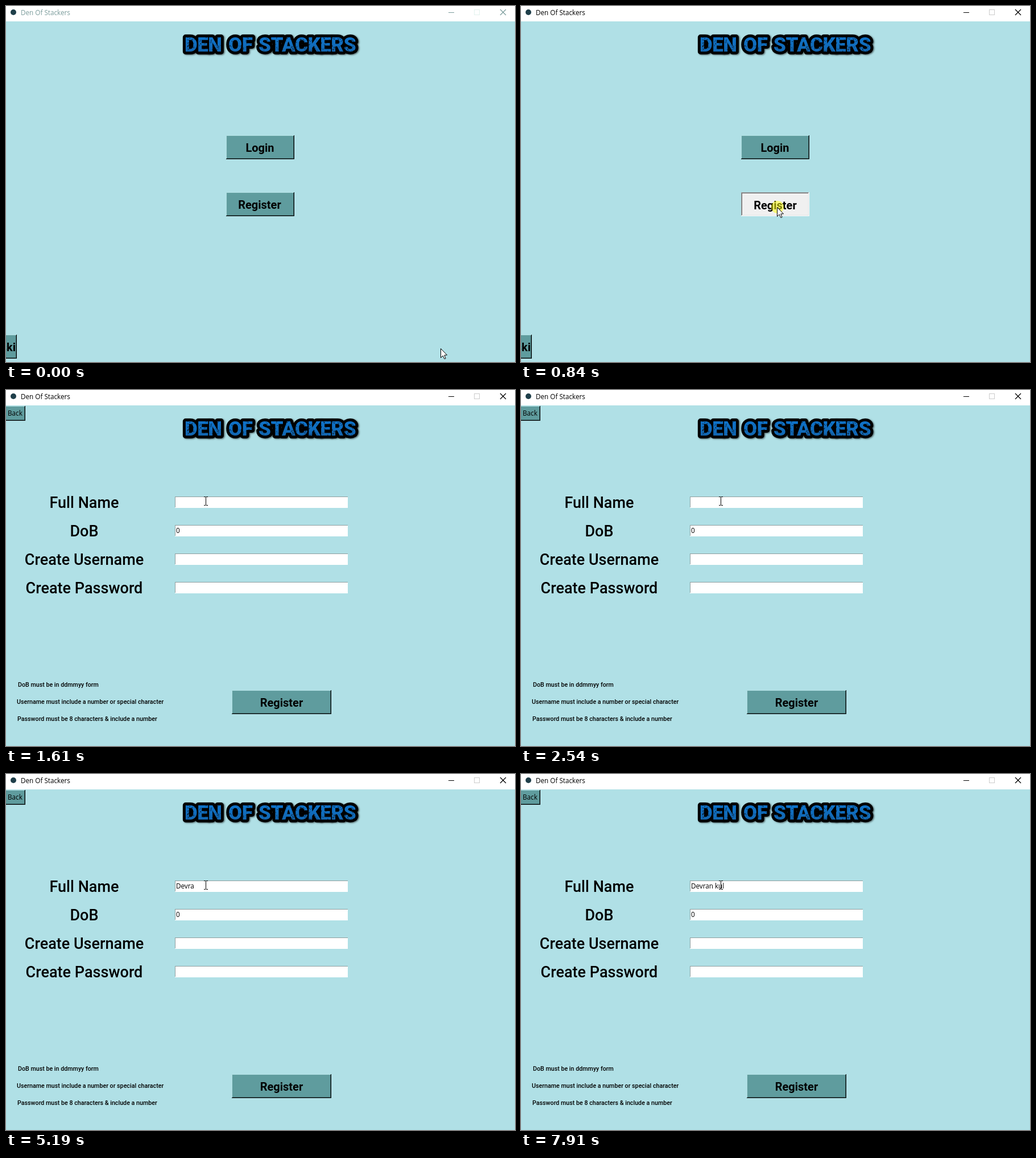
Recreate the animation shown at these times as an HTML page with a canvas. Size 895x625 px, loop 8000 ms.

```html
<!DOCTYPE html>
<html lang="en">
<head>
<meta charset="utf-8">
<title>Den Of Stackers</title>
<style>
html, body { margin: 0; width: 100%; height: 100%; overflow: hidden; background: #b0e0e6; }
canvas { display: block; }
</style>
</head>
<body>
<canvas id="stage" width="895" height="625"></canvas>
<script>
const LOOP = 8000;
const ctx = document.getElementById('stage').getContext('2d');
const UI = '11.7px "Open Sans", "Noto Sans", sans-serif';
const face = (weight, size) => `${weight} ${size}px Roboto, Inter, sans-serif`;
const BOLD = face(600, 20), LABEL = face(500, 27), HINT = face(500, 10.7);
const TEAL = { fill: '#5f9c9e', light: '#afdde0', mid: '#5f9c9e', shade: '#395f60', dark: '#000' };
const GRAY = { fill: '#f0f0f0', light: '#fff', mid: '#f0f0f0', shade: '#a0a0a0', dark: '#696969' };
const PRESS = 840, FORM = 990;
const NAME = 'Devran kul';
const KEYS = [3700, 4180, 4570, 4790, 5190, 5800, 6350, 6900, 7130, 7600];
const CARET = [[1930, 2540], [2770, 3400], [3700, 4330], [4570, 5190],
  [5490, 6120], [6350, 7010], [7280, 7910]];

function rect(x, y, w, h, color) {
  ctx.fillStyle = color;
  ctx.fillRect(x, y, w, h);
}

function text(str, x, y, font, color = '#000', align = 'left') {
  ctx.font = font;
  ctx.fillStyle = color;
  ctx.textAlign = align;
  ctx.fillText(str, x, y);
}

function line(points, color, width = 1) {
  ctx.beginPath();
  points.forEach(([x, y]) => ctx.lineTo(x, y));
  ctx.strokeStyle = color;
  ctx.lineWidth = width;
  ctx.stroke();
}

// Two-pixel bevel: outer and inner colours for the top-left and bottom-right sides
function bevel(x, y, w, h, fill, tl, br) {
  rect(x, y, w, h, fill);
  [0, 1].forEach(i => {
    const W = w - 2 * i, H = h - 2 * i;
    rect(x + i, y + i, W, 1, tl[i]);
    rect(x + i, y + i, 1, H, tl[i]);
    rect(x + i, y + h - 1 - i, W, 1, br[i]);
    rect(x + w - 1 - i, y + i, 1, H, br[i]);
  });
}

function button(x, y, w, h, c = TEAL, sunken = false) {
  if (sunken) bevel(x, y, w, h, c.fill, [c.shade, c.dark], [c.light, '#e3e3e3']);
  else bevel(x, y, w, h, c.fill, [c.light, c.mid], [c.dark, c.shade]);
}

function entry(y) {
  rect(297, y, 304, 20, '#fff');
  rect(297, y, 304, 1, '#8f9fa0');
  rect(297, y, 1, 19, '#8f9fa0');
}

function makeLogo() {
  const layer = document.createElement('canvas');
  layer.width = 895;
  layer.height = 100;
  const g = layer.getContext('2d');
  const words = [['DEN', 314], ['OF', 391], ['STACKERS', 444]];
  g.font = face(900, 35);
  g.letterSpacing = '-0.5px';
  const blue = g.createLinearGradient(0, 54, 0, 80);
  blue.addColorStop(0, '#0e74cc');
  blue.addColorStop(1, '#1266b0');
  g.fillStyle = blue;
  words.forEach(([w, x]) => g.fillText(w, x, 79.5));

  // Worn look, kept inside the letters
  let seed = 7;
  const rnd = () => (seed = seed * 16807 % 2147483647) / 2147483647;
  g.globalCompositeOperation = 'source-atop';
  g.strokeStyle = '#071c30';
  for (let i = 0; i < 260; i++) {
    const x = 312 + rnd() * 308, y = 53 + rnd() * 28;
    g.lineWidth = 0.4 + rnd() * 0.7;
    g.beginPath();
    g.moveTo(x, y);
    g.lineTo(x + rnd() * 8 - 4, y + rnd() * 8 - 4);
    g.stroke();
  }

  g.globalCompositeOperation = 'destination-over';
  g.lineJoin = 'round';
  g.lineWidth = 10;
  g.strokeStyle = '#000';
  g.shadowColor = 'rgba(0,0,0,.6)';
  g.shadowBlur = 3;
  g.shadowOffsetX = g.shadowOffsetY = 1.5;
  words.forEach(([w, x]) => g.strokeText(w, x, 79.5));
  return layer;
}

function titleBar(active) {
  const ink = active ? '#000' : '#7b9c9c';
  rect(0, 0, 895, 27, '#fff');
  ctx.beginPath();
  ctx.arc(13, 11, 5, 0, 7);
  ctx.fillStyle = '#1f3f4a';
  ctx.fill();
  text('Den Of Stackers', 26, 16, UI, ink);
  rect(778, 11, 10, 1, ink);
  ctx.strokeStyle = active ? '#ccc' : '#e2f2ee';
  ctx.lineWidth = 1;
  ctx.strokeRect(823.5, 6.5, 9, 9);
  line([[869, 6], [879, 16]], ink, 1.2);
  line([[879, 6], [869, 16]], ink, 1.2);
}

function arrow(x, y) {
  const shape = [[0, 0], [0, 16], [3.7, 12.5], [6.3, 18], [8.6, 17.3], [6.3, 11.5], [11, 11.3]];
  ctx.beginPath();
  shape.forEach(([dx, dy]) => ctx.lineTo(x + dx + 0.5, y + dy + 0.5));
  ctx.closePath();
  ctx.fillStyle = '#fff';
  ctx.fill();
  ctx.strokeStyle = '#000';
  ctx.lineWidth = 1;
  ctx.lineJoin = 'round';
  ctx.stroke();
  ctx.lineJoin = 'miter';
}

function beam(x, y) {
  rect(x, y - 7, 1, 14, '#000');
  [y - 8, y + 7].forEach(top => {
    rect(x - 3, top, 3, 1, '#000');
    rect(x + 1, top, 3, 1, '#000');
  });
}

function spot(x, y) {
  ctx.beginPath();
  ctx.arc(x, y, 11, 0, 7);
  ctx.fillStyle = 'rgba(255,255,0,.5)';
  ctx.fill();
}

// The pointer is sampled in equal steps and eased between two points
function glide(t, start, step, count, from, to) {
  const k = t < start ? 0 : Math.min(count, Math.floor((t - start) / step) + 1) / count;
  const e = k * k * (3 - 2 * k);
  return from.map((v, i) => Math.round(v + (to[i] - v) * e));
}

function menu(t) {
  const [x, y] = glide(t, 70, 95, 8, [764, 601], [450, 353]);
  const down = t >= PRESS;
  const over = x >= 387 && x < 507 && y >= 327 && y < 369;
  const shift = down ? 1 : 0;
  button(387, 227, 120, 42);
  text('Login', 446.5, 256, BOLD, '#000', 'center');
  button(387, 327, 120, 42, over ? GRAY : TEAL, down);
  text('Register', 446 + shift, 356 + shift, BOLD, '#000', 'center');
  button(-101, 577, 120, 42);
  text('ski', 17, 606, BOLD, '#000', 'right');
  if (down) spot(451, 353);
  arrow(x, y);
}

function form(t) {
  button(-2, 28, 36, 26);
  text('Back', 3, 45, UI);
  ['Full Name', 'DoB', 'Create Username', 'Create Password'].forEach((label, i) => {
    text(label, 137.5, 207 + i * 50, LABEL, '#000', 'center');
    entry(187 + i * 50);
  });
  text('0', 299, 251, UI);
  text('DoB must be in ddmmyy form', 21, 521, HINT);
  text('Username must include a number or special character', 19, 551, HINT);
  text('Password must be 8 characters & include a number', 20, 581, HINT);
  button(397, 527, 175, 42);
  text('Register', 484.5, 556, BOLD, '#000', 'center');

  const typed = NAME.slice(0, KEYS.filter(k => t >= k).length);
  text(typed, 299, 201, UI);
  if (CARET.some(([on, off]) => t >= on && t < off)) {
    rect(298 + Math.round(ctx.measureText(typed).width), 189, 2, 15, '#000');
  }

  const [x, y] = glide(t, 1150, 76.6, 7, [452, 354], [351, 195]);
  if (t >= 1930 && t < 2080) spot(350, 194);
  const inEntry = y >= 187 && (y - 187) % 50 < 20;
  (inEntry ? beam : arrow)(x, y);
}

const logo = makeLogo();

function draw(now) {
  const t = now % LOOP;
  rect(0, 0, 895, 625, '#b0e0e6');
  titleBar(t >= PRESS);
  ctx.drawImage(logo, 0, 0);
  (t < FORM ? menu : form)(t);
  requestAnimationFrame(() => draw(performance.now() - start));
}

const start = performance.now();
draw(0);
</script>
</body>
</html>
```
